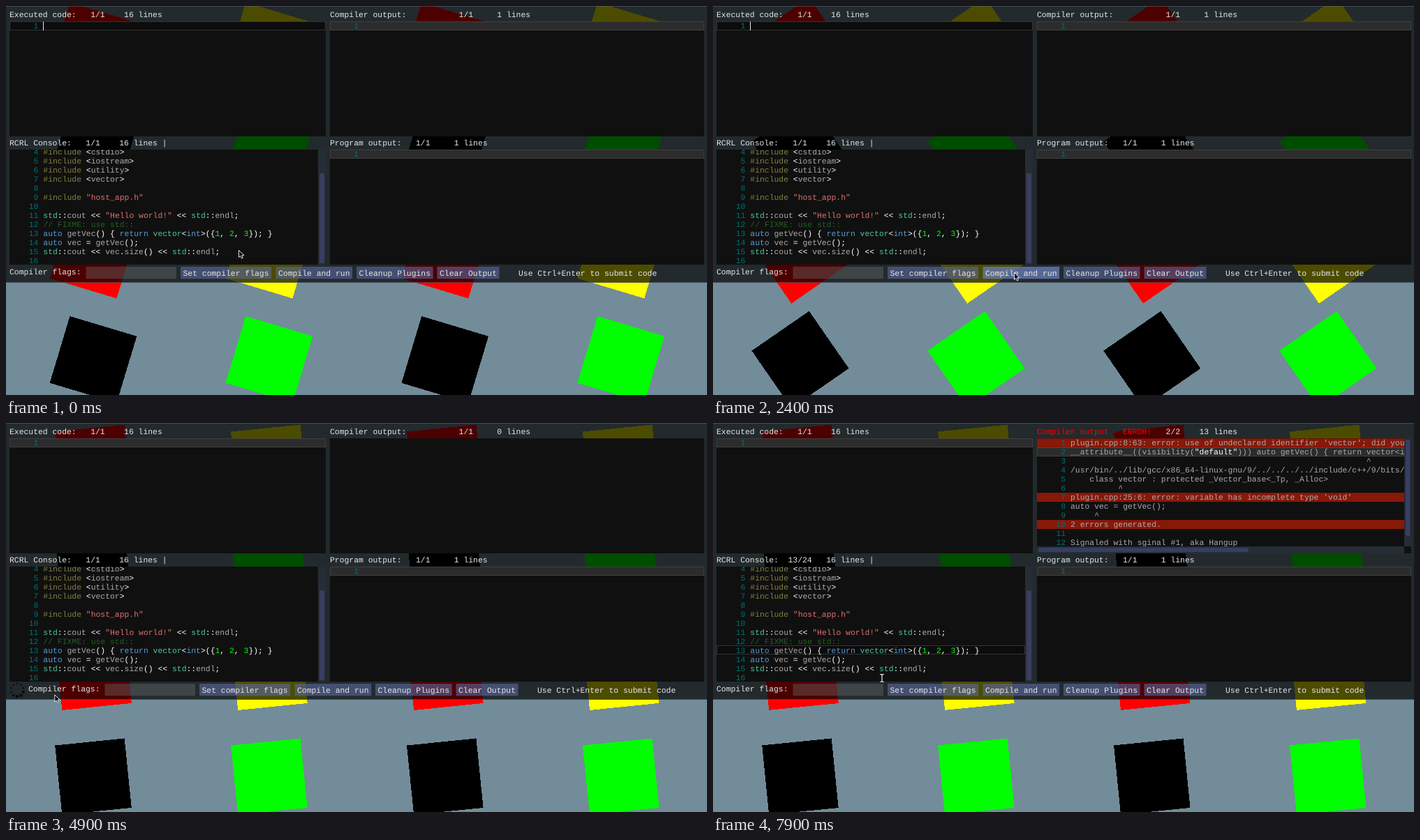
An HTML page for the animation above (8000 ms loop, 1004x558 px).

```html
<!DOCTYPE html>
<html lang="en">
<head>
<meta charset="utf-8">
<title>Live C++ console</title>
<style>
  html, body { margin: 0; width: 100%; height: 100%; overflow: hidden; background: #738c99; }
  #stage { display: block; width: 1004px; height: 558px; }
  text {
    font: 11.4px "Liberation Mono", monospace;
    white-space: pre;
    text-rendering: geometricPrecision;
  }
</style>
</head>
<body>
<svg id="stage" viewBox="0 0 1004 558"></svg>
<script>
const LOOP = 8000, CHAR = 6.841, LINE = 12.97;
const BUSY = 3200, FAILED = 5200, CLICKED = 7400;
const UI = '#e6e6e6', PLAIN = '#aaa', BACK = '#101010';
const TRACK = '#252d35', GRAB = '#393e62';

const stage = document.getElementById('stage');

const range = (from, to, step) =>
  Array.from({ length: Math.round((to - from) / step) + 1 }, (_, i) => from + i * step);

const ticks = [
  0, 100, ...range(400, 2600, 100), ...range(3200, 3800, 200), ...range(4100, 4900, 200),
  5200, 5400, 5500, 5700, 5900, 6000, 6200, 6400, 6600, 6700, 6900,
  7200, 7400, 7500, 7700, 7900
];

// [time, degrees]
const spin = [
  [0, 16.7], [1800, -85.4], [3200, -177], [4100, -226.2],
  [5700, -325.4], [6900, -397], [7900, -455.7]
];

// [time, x, y]
const mousePath = [
  [0, 333, 350], [400, 333, 350], [1300, 431, 382], [3300, 431, 382],
  [4100, 174, 396], [5200, 30, 387], [5800, 30, 387], [6900, 249, 341],
  [7200, 249, 341], [7400, 212, 326], [7900, 242, 366]
];

const source = [
  '#include <cstdio>', '#include <iostream>', '#include <utility>', '#include <vector>', '',
  '#include "host_app.h"', '',
  'std::cout << "Hello world!" << std::endl;',
  '// FIXME: use std::',
  'auto getVec() { return vector<int>({1, 2, 3}); }',
  'auto vec = getVec();',
  'std::cout << vec.size() << std::endl;', ''
];

const errors = [
  "plugin.cpp:8:63: error: use of undeclared identifier 'vector'; did you mean",
  '__attribute__((visibility("default"))) auto getVec() { return vector<int>',
  ' '.repeat(62) + '^',
  '/usr/bin/../lib/gcc/x86_64-linux-gnu/9/../../../../include/c++/9/bits/stl_vector.h',
  '    class vector : protected _Vector_base<_Tp, _Alloc>',
  ' '.repeat(10) + '^',
  "plugin.cpp:25:6: error: variable has incomplete type 'void'",
  'auto vec = getVec();',
  '     ^',
  '2 errors generated.',
  '',
  'Signaled with sginal #1, aka Hangup'
];

function track(keys, t) {
  let i = 0;
  while (i < keys.length - 2 && t >= keys[i + 1][0]) i++;
  const [a, b] = [keys[i], keys[i + 1]];
  const k = Math.min(1, (t - a[0]) / (b[0] - a[0]));
  return a.slice(1).map((v, n) => v + (b[n + 1] - v) * k);
}

const escape = s => s.replace(/&/g, '&amp;').replace(/</g, '&lt;').replace(/>/g, '&gt;');
const rect = (x, y, w, h, fill, extra = '') =>
  `<rect x="${x}" y="${y}" width="${w}" height="${h}" fill="${fill}" ${extra}/>`;
const span = (s, fill) => `<tspan fill="${fill}">${escape(s)}</tspan>`;
const rawText = (x, y, body, extra = '') => `<text x="${x}" y="${y}" ${extra}>${body}</text>`;
const text = (x, y, s, fill = UI, extra = '') => rawText(x, y, span(s, fill), extra);
const clip = (x, y, w, h, body) =>
  `<svg x="${x}" y="${y}" width="${w}" height="${h}" viewBox="${x} ${y} ${w} ${h}">${body}</svg>`;
const lineNumber = (x, y, n) => text(x - CHAR, y, String(n), '#007070', 'text-anchor="end"');

function currentLine(x, y, w, focused) {
  const fill = focused ? 'rgba(0,0,0,.25)' : 'rgba(128,128,128,.25)';
  return rect(x + .5, y + .5, w - 1, 12, fill, 'stroke="rgba(160,160,160,.25)"');
}

function highlight(line) {
  const token = /\/\/.*|#\w+|"[^"]*"|\d+|\w+|[^\w"#]/g;
  const colour = s =>
    s.startsWith('//') ? '#206020' :
    s[0] === '#' ? '#808040' :
    s[0] === '"' ? '#e07070' :
    /^\d/.test(s) ? '#0f0' :
    /^(auto|return|int)$/.test(s) ? '#569cd6' :
    /^(std|vector)$/.test(s) && line[0] !== '#' ? '#4dc69b' :
    /^\w/.test(s) ? PLAIN : '#fff';
  return (line.match(token) || []).map(s => span(s, colour(s))).join('');
}

function squares(angle) {
  let out = '';
  for (let row = 0; row < 4; row++) {
    for (let col = 0; col < 4; col++) {
      const fill = row % 2 ? ['#000', '#0f0'][col % 2] : ['#f00', '#ff0'][col % 2];
      const x = 125 + col * 251.9, y = 57.2 + row * 150;
      out += rect(-50, -50, 100, 100, fill,
        `transform="translate(${x} ${y}) rotate(${angle})" shape-rendering="crispEdges"`);
    }
  }
  return out;
}

function executedPane(t) {
  const focused = t < BUSY;
  const caret = focused && (t + 700) % 800 >= 400;
  return text(5, 16.3, 'Executed code:   1/1    16 lines') +
    rect(5, 22, 453, 165, BACK) + currentLine(5, 22, 453, focused) +
    lineNumber(53.3, 32, 1) + (caret ? rect(53, 22.5, 1, 12.5, UI) : '');
}

function compilerPane(t) {
  const back = rect(464, 22, 536, 165, BACK);
  if (t < FAILED) {
    const idle = t < BUSY;
    return text(464, 16.3, `Compiler output:           1/1     ${idle ? 1 : 0} lines`) + back +
      (idle ? currentLine(464, 22, 536) + lineNumber(512, 32, 1) : '');
  }
  const lines = errors.map((line, i) => {
    const top = 22.3 + i * LINE;
    const body = line.split(/("\w+")/).map((s, k) => span(s, k % 2 ? '#fff' : PLAIN)).join('');
    return (/error/.test(line) ? rect(464, top, 526, LINE, 'rgba(255,32,0,.5)') : '') +
      (i === 1 ? currentLine(464, 35, 526) : '') +
      lineNumber(512, top + 9.7, i + 1) + rawText(512, top + 9.7, body);
  }).join('');
  return rawText(464, 16.3,
      span('Compiler output - ERROR!', '#f00') + span('   2/2    13 lines', UI)) +
    back + clip(464, 22, 526, 155, lines) +
    rect(990, 22, 10, 155, TRACK) + rect(992, 24, 6, 138, GRAB, 'rx="2"') +
    rect(464, 177, 526, 10, TRACK) + rect(466, 179, 301, 6, GRAB, 'rx="2"');
}

function consolePane(t) {
  const clicked = t >= CLICKED;
  const place = clicked ? ' 13/24 ' : t >= FAILED ? ' 16/1  ' : '  1/1  ';
  const lines = source.map((line, i) => {
    const y = 213.2 + i * LINE;
    return lineNumber(53.3, y, i + 4) + rawText(53.3, y, highlight(line));
  }).join('');
  return text(5, 200.3, `RCRL Console: ${place}  16 lines |`) +
    rect(5, 206, 442, 165, BACK) +
    clip(5, 206, 442, 165, (clicked ? currentLine(5, 319, 442, true) : '') + lines) +
    rect(447, 206, 11, 165, TRACK) + rect(449, 240, 7, 129, GRAB, 'rx="2"');
}

function programPane() {
  return text(464, 200.3, 'Program output:   1/1     1 lines') +
    rect(464, 206, 536, 165, BACK) + currentLine(464, 206, 536) + lineNumber(512, 215.9, 1);
}

function spinner(t) {
  const count = 10;
  return range(0, count - 1, 1).map(i => {
    const a = i * 2 * Math.PI / count;
    const grow = Math.max(0, Math.sin(t * .006 - a));
    return `<circle cx="${16 + 9.3 * Math.sin(a)}" cy="${383 - 9.3 * Math.cos(a)}" r="${1.2 + 1.2 * grow}" fill="#090b0d"/>`;
  }).join('');
}

function toolbar(t, [mx, my]) {
  const busy = t >= BUSY && t < FAILED;
  const shift = busy ? 27 : 0;
  const button = (x, label) => {
    x += shift;
    const w = label.length * CHAR + 7;
    const hover = mx >= x && mx < x + w && my >= 374 && my < 391;
    return rect(x, 374, w, 17.3, hover ? 'rgba(102,122,181,.79)' : 'rgba(89,102,156,.62)') +
      text(x + 3.5, 386.5, label);
  };
  return (busy ? spinner(t) : '') +
    text(5 + shift, 384.5, 'Compiler flags:') +
    rect(114.5 + shift, 374, 129.5, 17.3, 'rgba(110,110,110,.39)') +
    button(250, 'Set compiler flags') + button(386.5, 'Compile and run') +
    button(502, 'Cleanup Plugins') + button(617.5, 'Clear Output') +
    text(734 + shift, 386.5, 'Use Ctrl+Enter to submit code');
}

function pointer(t, [x, y]) {
  const at = `transform="translate(${x} ${y})"`;
  if (t > 5900 && y < 371) {
    const beam = 'M-3-5.5H-1L0-4.5L1-5.5H3M0-4.5V4.5M-3 5.5H-1L0 4.5L1 5.5H3';
    return `<g ${at} fill="none"><path d="${beam}" stroke="#000" stroke-width="3"/>` +
      `<path d="${beam}" stroke="#fff" stroke-width="1.2"/></g>`;
  }
  return `<path ${at} d="M.5.5V10.5L2.8 8.4L4.5 12L6.3 11.2L4.7 7.7H8Z" fill="#000" stroke="#fff" stroke-width=".9"/>`;
}

function render(t) {
  const mouse = track(mousePath, t);
  const edge = 'rgba(110,110,128,.5)';
  stage.innerHTML = rect(0, 0, 1004, 558, '#738c99') + squares(track(spin, t)[0]) +
    rect(0, 0, 1004, 397, 'rgba(0,0,0,.7)') +
    rect(0, 0, 1004, 1, edge) + rect(0, 396, 1004, 1, edge) +
    executedPane(t) + compilerPane(t) + consolePane(t) + programPane() +
    toolbar(t, mouse) + pointer(t, mouse);
}

const start = performance.now();
let shown = -1;

function loop() {
  const now = (performance.now() - start) % LOOP;
  const tick = ticks.filter(t => t <= now).pop();
  if (tick !== shown) render(shown = tick);
  requestAnimationFrame(loop);
}
loop();
</script>
</body>
</html>
```
